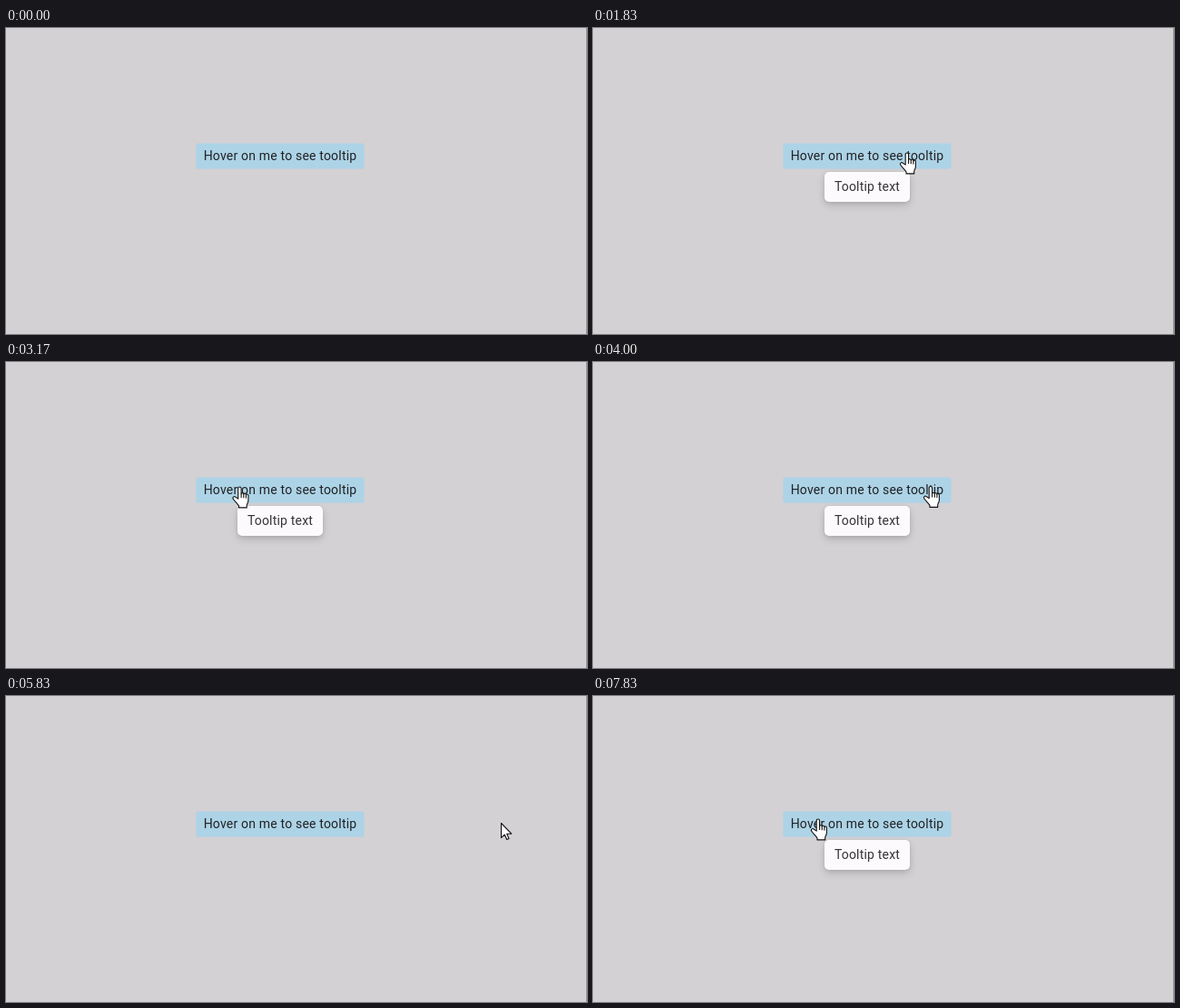
Animation, 640 px wide and 338 px high, one loop 8 s. Source, as an HTML page:

```html
<!DOCTYPE html>
<html lang="en">
<head>
<meta charset="utf-8">
<title>Tooltip on hover</title>
<style>
html, body { margin: 0; width: 100%; height: 100%; overflow: hidden; background: #d4d1d4; }
#stage {
  position: relative; width: 640px; height: 338px; overflow: hidden;
  font: 14px/20px Roboto, sans-serif; letter-spacing: .19px; color: #202124;
  text-align: center; white-space: nowrap;
}
#stage > * { position: absolute; box-sizing: border-box; }
.edge { left: 639px; top: 0; width: 1px; height: 338px; background: #969396; }
.button {
  left: 209px; top: 127px; width: 186px; height: 29px; padding: 3px 0;
  background: #add3e6; border: 1px solid #bbd2e0; border-radius: 3px;
}
.tip {
  left: 255px; top: 159px; width: 94px; height: 33px; padding: 6px 0;
  background: #fdfafd; border-radius: 5px; color: #333335;
  box-shadow: 0 4px 9px rgba(0, 0, 0, .15), 0 1px 4px rgba(0, 0, 0, .08);
}
svg { left: 0; top: 0; }
.shape { fill: #fff; stroke: #111; stroke-width: 1.1; stroke-linejoin: round; stroke-linecap: round; }
</style>
</head>
<body>
<div id="stage">
  <div class="edge"></div>
  <div class="button">Hover on me to see tooltip</div>
  <div class="tip" id="tip">Tooltip text</div>
  <svg width="640" height="338">
    <g id="arrow" class="shape">
      <path d="M.5 .5V16.6L4.2 13.1 6.7 18.6 9.1 17.6 6.7 12.2H11.8Z"/>
    </g>
    <g id="hand" class="shape">
      <path d="M-1.8 13.6V2.2a1.7 1.7 0 0 1 3.4 0V8.2a1.4 1.4 0 0 1 2.7 .2a1.4 1.4 0 0 1 2.6 .7a1.4 1.4 0 0 1 2.5 1.1V15.6c0 2.6-1.7 3.7-1.7 5.6V23.4H-1V21.4C-2.4 19-5.2 16.8-7.2 13.7a1.6 1.6 0 0 1 2.3-2.2Z"/>
      <path d="M1.6 8.2V12M4.3 8.6V12.2M6.9 9.4V12.6" fill="none"/>
    </g>
  </svg>
</div>
<script>
const LOOP = 8000, RATE = 6;

// Turning points of the pointer: step (sixths of a second), x, y.
const turns = [
  [1, 611, 138], [2, 611, 138], [9, 268, 138], [10, 229, 138],
  [11, 346, 137.5], [13, 346, 137.5], [16, 219, 135], [19, 257.5, 137.5],
  [21, 229, 137], [24, 372, 137], [27, 229, 138], [29, 367, 137.5],
  [31, 230, 138], [34, 546, 140], [35, 545, 140], [38, 230, 130],
  [41, 328, 130.5], [44, 229, 135], [47, 248, 135.5]
];

const $ = id => document.getElementById(id);
const show = (el, on) => { el.style.visibility = on ? "visible" : "hidden"; };
const ease = p => (1 - Math.cos(Math.PI * p)) / 2;
const onButton = ([x, y]) => x >= 209 && x < 395 && y >= 127 && y < 156;

function pointerAt(step) {
  const next = turns.findIndex(turn => turn[0] > step);
  if (next === 0) return null;
  if (next < 0) return turns[turns.length - 1].slice(1);
  const [s0, x0, y0] = turns[next - 1], [s1, x1, y1] = turns[next];
  const p = ease((step - s0) / (s1 - s0));
  return [x0 + (x1 - x0) * p, y0 + (y1 - y0) * p];
}

function draw(ms) {
  // The pointer jumps from step to step; the 5 ms absorb rounded times.
  const pos = pointerAt(Math.floor((ms % LOOP + 5) * RATE / 1000));
  const over = !!pos && onButton(pos);
  show($("tip"), over);
  show($("hand"), over);
  show($("arrow"), pos && !over);
  if (pos) $(over ? "hand" : "arrow").setAttribute("transform", `translate(${pos})`);
}

const begin = performance.now();
function tick() {
  draw(performance.now() - begin);
  requestAnimationFrame(tick);
}
tick();
</script>
</body>
</html>
```
